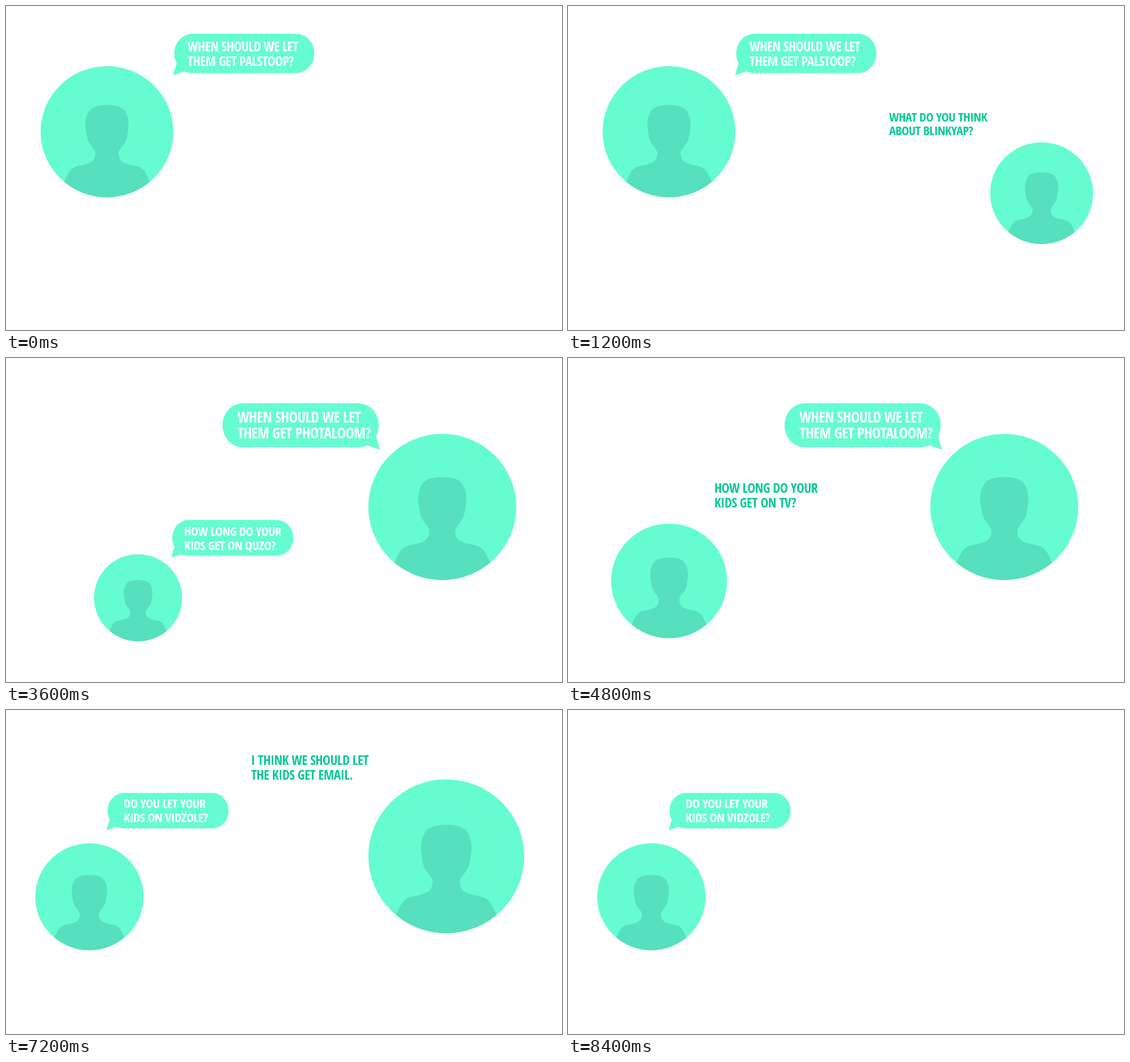
An HTML page that plays this animation: 980x572 px, repeating every 9.6 s.

```html
<!DOCTYPE html>
<html lang="en">
<head>
<meta charset="utf-8">
<title>Parents talking</title>
<style>
  html, body { margin: 0; width: 100%; height: 100%; overflow: hidden; background: #fff; }
  svg { display: block; width: 980px; height: 572px; }
  .mint { fill: #66fcd1; }
  .person { fill: #57e0be; }
  text { letter-spacing: -.02em; }
</style>
</head>
<body>
<svg id="stage" viewBox="0 0 980 572">
  <defs>
    <clipPath id="disc"><ellipse rx="137.3" ry="135.8"/></clipPath>
    <path id="half" d="M-1-55.5H0C18-55.5 31-52 37-43C43-34 45-23 44.7-13C44-3 42 8 40 17
      C35 28 28 34 24.3 41C23.5 51 26 59 34 63.5C44 69 57 69.5 67 73C78 78 84 92 89 105V140H-1Z"/>
    <g id="avatar">
      <ellipse class="mint" rx="137.3" ry="135.8"/>
      <g class="person" clip-path="url(#disc)">
        <use href="#half"/>
        <use href="#half" transform="scale(-1 1)"/>
      </g>
    </g>
  </defs>
</svg>
<script>
const STEP = 1200;
const DISC_RADIUS = 137.3;
const stage = document.getElementById('stage');

// avatar: centre x, centre y, radius; text: left, centre of first row, scale
// bubble: left, top, width, height, tail side (-1 left, 1 right)
const speakers = [
  { avatar: [178, 222, 117], text: [320, 71.5, 1], bubble: [296.5, 49, 247, 69.5, -1],
    lines: ['WHEN SHOULD WE LET', 'THEM GET PALSTOOP?'] },
  { avatar: [834.8, 330.5, 90.7], text: [566, 196, .94],
    lines: ['WHAT DO YOU THINK', 'ABOUT BLINKYAP?'] },
  { avatar: [232.8, 423.3, 77.7], text: [314, 306.5, .94], bubble: [293, 286, 213.5, 63, -1],
    lines: ['HOW LONG DO YOUR', 'KIDS GET ON QUZO?'] },
  { avatar: [769, 263, 130.4], text: [408, 104.3, 1.113], bubble: [381.5, 80, 275.5, 77.5, 1],
    lines: ['WHEN SHOULD WE LET', 'THEM GET PHOTALOOM?'] },
  { avatar: [178.2, 393.5, 102.2], text: [258, 229.2, 1],
    lines: ['HOW LONG DO YOUR', 'KIDS GET ON TV?'] },
  { avatar: [776, 258.3, 137.3], text: [432, 88.7, 1],
    lines: ['I THINK WE SHOULD LET', 'THE KIDS GET EMAIL.'] },
  { avatar: [147, 329.8, 95.5], text: [207.5, 165.5, .94], bubble: [179, 146.5, 213.5, 62.5, -1],
    lines: ['DO YOU LET YOUR', 'KIDS ON VIDZOLE?'] }
];

function add(parent, tag, attributes) {
  const node = document.createElementNS('http://www.w3.org/2000/svg', tag);
  for (const name in attributes) node.setAttribute(name, attributes[name]);
  return parent.appendChild(node);
}

// Use the narrowest available face, at a size that suits the row length.
function chooseFace() {
  const pen = document.createElement('canvas').getContext('2d');
  const sample = 'WHEN SHOULD WE LET';
  const families = ['Noto Sans', 'Open Sans', 'Open Sans Condensed', 'Roboto',
    'Roboto Condensed', 'Liberation Sans Narrow'];
  const faces = families.map(name => {
    const family = `"${name}", sans-serif`;
    pen.font = `bold extra-condensed 100px ${family}`;
    return { family, em: pen.measureText(sample).width / 100 - .02 * sample.length };
  });
  const face = faces.sort((a, b) => a.em - b.em)[0];
  return { family: face.family, size: Math.min(26, 195 / face.em) };
}

function drawBubble(group, [x, y, width, height, side]) {
  const s = height / 70;
  add(group, 'rect', { class: 'mint', x, y, width, height, rx: 32 * s, ry: height / 2 });
  const edge = side < 0 ? x : x + width;
  add(group, 'path', { class: 'mint', d: 'M4 53L-2 74L17.5 67L24 69L30 50Z',
    transform: `translate(${edge} ${y}) scale(${-side * s} ${s})` });
}

function drawText(group, { text: [x, y, scale], lines, bubble }, face) {
  const size = face.size * scale;
  lines.forEach((line, row) => {
    add(group, 'text', {
      x, y: y + row * 26 * scale + .357 * size,
      fill: bubble ? '#fff' : '#00ca96',
      style: `font: bold extra-condensed ${size}px ${face.family}`
    }).textContent = line;
  });
}

const face = chooseFace();
const groups = speakers.map(speaker => {
  const group = add(stage, 'g', {});
  const [x, y, radius] = speaker.avatar;
  add(group, 'use', { href: '#avatar',
    transform: `translate(${x} ${y}) scale(${radius / DISC_RADIUS})` });
  if (speaker.bubble) drawBubble(group, speaker.bubble);
  drawText(group, speaker, face);
  return group;
});

// A new speaker appears at every step and stays for two steps.
function render() {
  const step = Math.floor(performance.now() / STEP) % (speakers.length + 1);
  groups.forEach((group, i) => {
    group.style.display = step === i || step === i + 1 ? '' : 'none';
  });
  requestAnimationFrame(render);
}
render();
</script>
</body>
</html>
```
